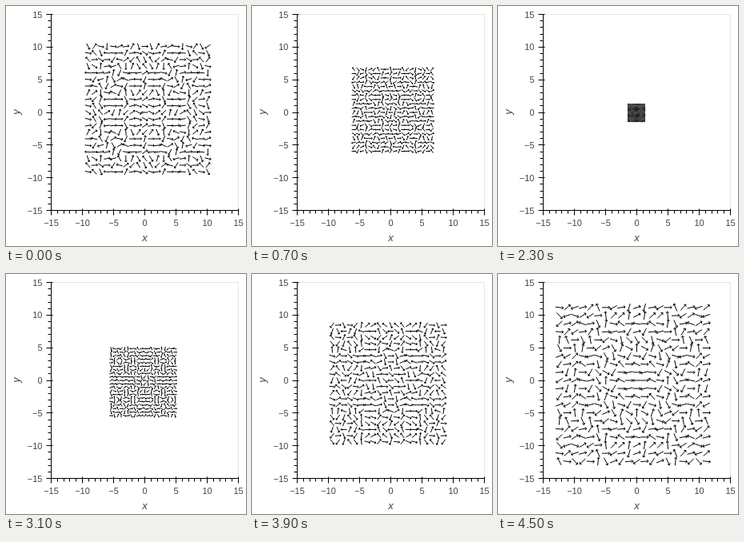
These frames come from a looping animation (300x300 px, 4.6 s). An HTML page with a canvas:

```html
<!DOCTYPE html>
<html lang="en">
<head>
<meta charset="utf-8">
<title>Vector field</title>
<style>
  html, body { margin: 0; width: 100%; height: 100%; overflow: hidden; background: #fff; }
  svg, canvas { position: absolute; left: 0; top: 0; }
  text { font: 11px Helvetica, Arial, "Liberation Sans", sans-serif; fill: #444; text-anchor: middle; }
  .tick-y { text-anchor: end; }
  .label { font-size: 13px; font-style: italic; }
  path { fill: none; stroke: #000; }
  .frame { stroke: #e5e5e5; }
</style>
</head>
<body>
<svg width="300" height="300">
  <path class="frame" d="M56.5 10.5H290.5V255.5H56.5Z"/>
  <path id="axes"/>
  <g id="ticks"></g>
  <text class="label" x="173.5" y="294">x</text>
  <text class="label" transform="translate(17 132.5) rotate(-90)">y</text>
</svg>
<canvas id="field" width="300" height="300"></canvas>
<script>
const FRAME_MS = 100, FRAMES = 46;
const ctx = document.getElementById('field').getContext('2d');
const px = x => 173.5 + x * 7.8;
const py = y => 133 - y * 245 / 30;
const snap = v => Math.round(v - 0.5) + 0.5;

function drawAxes() {
  let path = 'M56.5 10V256M56 255.5H291', labels = '';
  for (let v = -15; v <= 15; v++) {
    const major = v % 5 === 0;
    const out = major ? 6 : 4, inner = major ? 2 : 0;
    path += `M${snap(px(v))} ${255.5 - inner}v${out + inner}`;
    path += `M${56.5 + inner} ${snap(py(v))}h${-out - inner}`;
    if (major) {
      const label = String(v).replace('-', '\u2212');
      labels += `<text x="${px(v)}" y="274.5">${label}</text>`;
      labels += `<text class="tick-y" x="45.5" y="${py(v) + 4}">${label}</text>`;
    }
  }
  document.getElementById('axes').setAttribute('d', path);
  document.getElementById('ticks').innerHTML = labels;
}

// Strokes stay separate so that overlapping antialiased edges build up.
function segment(x0, y0, x1, y1) {
  ctx.beginPath();
  ctx.moveTo(px(x0), py(y0));
  ctx.lineTo(px(x1), py(y1));
  ctx.stroke();
}

function arrow(x, y, angle, length) {
  const dx = Math.cos(angle) * length / 2, dy = Math.sin(angle) * length / 2;
  const tipX = x + dx, tipY = y + dy;
  segment(tipX, tipY, x - dx, y - dy);
  for (const turn of [Math.PI / 4, -Math.PI / 4]) {
    segment(tipX, tipY,
      tipX - Math.cos(angle + turn) * length / 4,
      tipY - Math.sin(angle + turn) * length / 4);
  }
}

function drawField(scale) {
  ctx.clearRect(0, 0, 300, 300);
  for (let i = -10; i < 10; i++) {
    for (let j = -10; j < 10; j++) {
      const x = i * scale, y = j * scale;
      arrow(x, y, Math.PI * (1 + Math.sin(x * x + y * y)), Math.abs(scale));
    }
  }
}

let shown = -1;
const start = performance.now();

function tick() {
  const step = Math.floor((performance.now() - start) / FRAME_MS) % FRAMES;
  if (step !== shown) {
    shown = step;
    drawField(-1.01 + 0.05 * step);
  }
  requestAnimationFrame(tick);
}

drawAxes();
tick();
</script>
</body>
</html>
```
